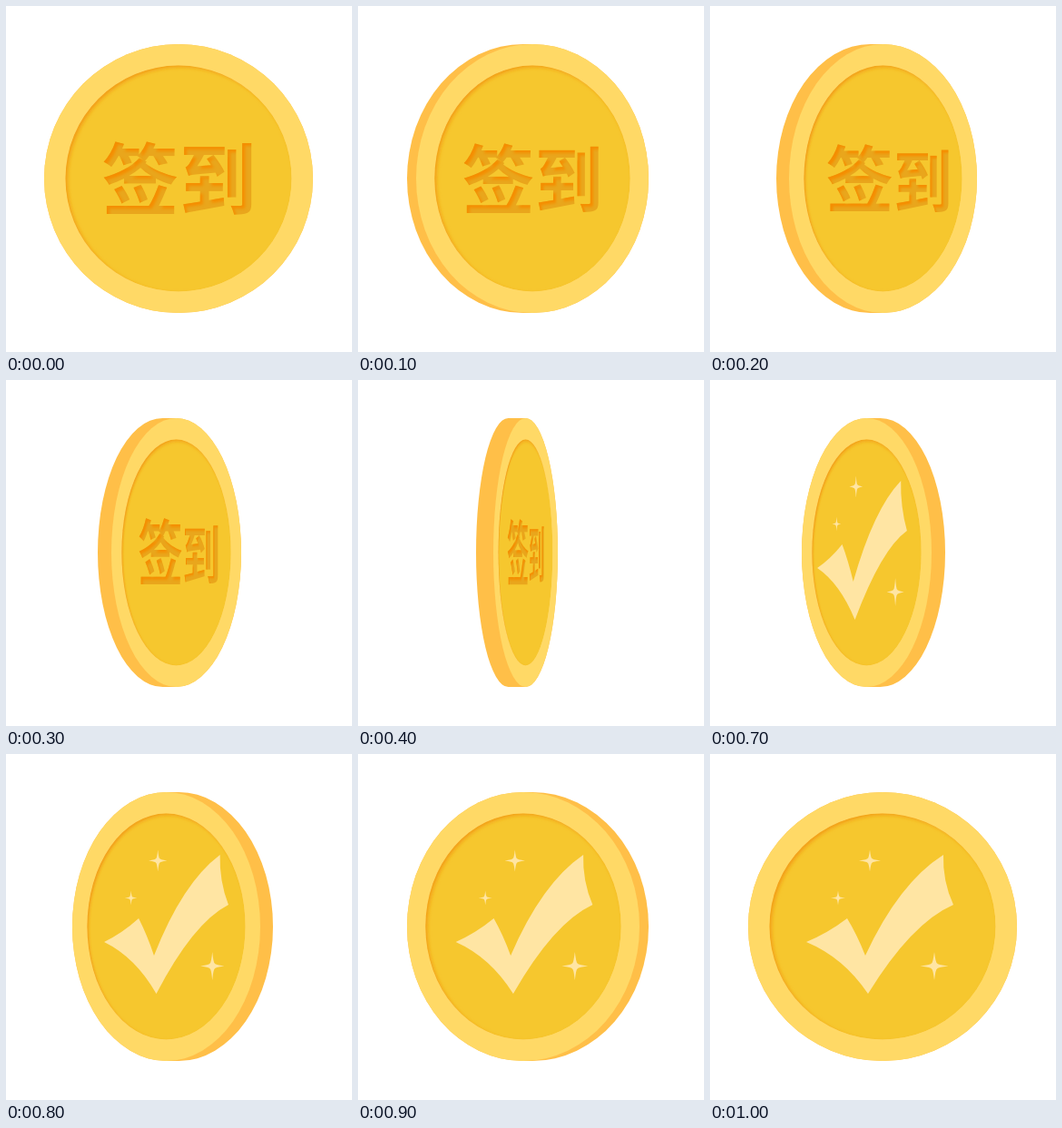
Write an HTML page that moves like this. It is 381 by 381 pixels and loops after 1100 ms.

```html
<!DOCTYPE html>
<html lang="zh">
<head>
<meta charset="utf-8">
<title>签到</title>
<style>
  html, body { margin: 0; width: 100%; height: 100%; overflow: hidden; background: #fff; }
  svg { display: block; width: 100vw; height: 100vh; }
  text { font: 700 85px "Noto Sans CJK SC", "Noto Sans CJK", "Noto Sans CJK JP", sans-serif; fill: #e9a61c; }
</style>
</head>
<body>
<svg viewBox="0 0 381 381">
  <defs>
    <clipPath id="well"><circle r="124.5"/></clipPath>
    <filter id="soft" x="-20%" y="-20%" width="140%" height="140%">
      <feGaussianBlur stdDeviation="2.2"/>
    </filter>
    <filter id="engrave" color-interpolation-filters="sRGB">
      <feOffset in="SourceAlpha" dx="3" dy="3"/>
      <feGaussianBlur stdDeviation="1.5" result="shifted"/>
      <feFlood flood-color="#f58d00"/>
      <feComposite in2="shifted" operator="out"/>
      <feComposite in2="SourceAlpha" operator="in" result="shade"/>
      <feMerge><feMergeNode in="SourceGraphic"/><feMergeNode in="shade"/></feMerge>
    </filter>
  </defs>
  <path id="edge" fill="#ffbf48"/>
  <g id="face">
    <circle r="148" fill="#ffd966"/>
    <g clip-path="url(#well)">
      <circle r="124.5" fill="#f6c72e"/>
      <path filter="url(#soft)" fill="#f29a18" fill-rule="evenodd"
        d="M-145 0a145 145 0 1 0 290 0a145 145 0 1 0-290 0zM-122.5 2a125 125 0 1 0 250 0a125 125 0 1 0-250 0z"/>
    </g>
  </g>
  <g id="label">
    <g><text x="-2.5" y="33" filter="url(#engrave)">签</text></g>
    <g><text x="-5" y="33" filter="url(#engrave)">到</text></g>
  </g>
  <g id="mark" fill="#ffe5a3">
    <path d="M106 207Q130 197 151 181Q162 199 171 222Q208 142 257 111Q256 140 268 166Q222 186 174 264Q147 224 106 207Z"/>
    <path id="stars"/>
  </g>
</svg>
<script>
const STEP = 100, STEPS = 11, EDGE_ON = 5, MID = 190, R = 148;

// Silhouette from flat to edge-on: left side, face half-width, thickness.
const turns = [
  [42, 148, 0], [54, 128, 10], [73, 103.5, 14],
  [101, 71.5, 15], [130, 35.5, 19], [160, 0, 20]
];
// Per turn, for each character: x, centre y, x scale, y scale.
const letters = [
  [[108, 190, 1, 1], [196, 190, 1, 1]],
  [[117, 190, .94, .96], [199.5, 191, .88, .92]],
  [[130, 190, .875, .93], [206, 192.5, .76, .87]],
  [[147, 190, .58, .92], [197, 192, .49, .82]],
  [[165, 190, .28, .91], [189, 191.5, .21, .77]]
];
// Per turn: centre and x scale of the tick with its stars.
const ticks = [[187, 1], [183, .93], [176.5, .845], [167.5, .61], [166.5, .3]];

const el = id => document.getElementById(id);
const edge = el("edge"), face = el("face"), label = el("label"), mark = el("mark");

const star = (x, y, r) => {
  const k = r * .2;
  return `M${x} ${y - r}Q${x + k / 2} ${y - k} ${x + k} ${y - k}Q${x + k} ${y - k / 2} ${x + r} ${y}` +
    `Q${x + k} ${y + k / 2} ${x + k} ${y + k}Q${x + k / 2} ${y + k} ${x} ${y + r}` +
    `Q${x - k / 2} ${y + k} ${x - k} ${y + k}Q${x - k} ${y + k / 2} ${x - r} ${y}` +
    `Q${x - k} ${y - k / 2} ${x - k} ${y - k}Q${x - k / 2} ${y - k} ${x} ${y - r}Z`;
};
el("stars").setAttribute("d", star(176, 117.5, 12) + star(141, 158.5, 8) + star(247, 233.5, 15.5));

const show = (node, on) => node.setAttribute("display", on ? "inline" : "none");
const place = (node, value) => node.setAttribute("transform", value);

function draw(time) {
  const step = Math.floor(time / STEP) % STEPS;
  const turn = EDGE_ON - Math.abs(EDGE_ON - step);
  const [left, half, thick] = turns[turn];
  const front = step < EDGE_ON, back = step > EDGE_ON;
  const x = left + half;

  edge.setAttribute("d", half
    ? `M${x} ${MID - R}h${thick}a${half} ${R} 0 0 1 0 ${2 * R}h${-thick}a${half} ${R} 0 0 1 0 ${-2 * R}z`
    : `M${x} ${MID - R}h${thick}v${2 * R}h${-thick}z`);
  show(face, half > 0);
  place(face, `translate(${x + (front ? thick : 0)} ${MID}) scale(${half / R} 1)`);

  show(label, front);
  if (front) letters[turn].forEach(([lx, ly, sx, sy], i) =>
    place(label.children[i], `translate(${lx} ${ly}) scale(${sx} ${sy})`));

  show(mark, back);
  if (back) {
    const [cx, sx] = ticks[turn];
    place(mark, `translate(${cx} 0) scale(${sx} 1) translate(-187 0)`);
  }
}

const start = performance.now();
function tick() {
  draw(performance.now() - start);
  requestAnimationFrame(tick);
}
tick();
</script>
</body>
</html>
```
